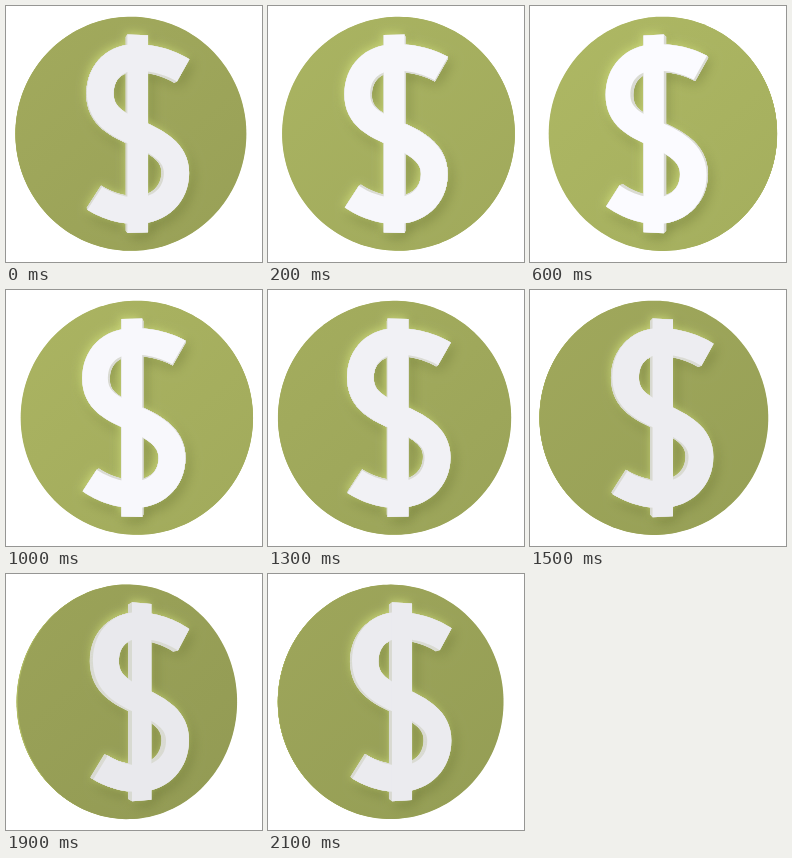
An HTML page with a canvas that plays this animation: 256 by 256 pixels, repeating every 2.2 s.

```html
<!DOCTYPE html>
<html lang="en">
<head>
<meta charset="utf-8">
<title>Turning dollar coin</title>
<style>
html, body { margin: 0; width: 100%; height: 100%; overflow: hidden; background: #fff; }
canvas { display: block; width: 256px; height: 256px; }
</style>
</head>
<body>
<canvas id="stage" width="256" height="256"></canvas>
<script>
const ctx = document.getElementById('stage').getContext('2d');
const LOOP = 2200, STEP = 100;
const EYE = 450, MID_X = 128.3, MID_Y = 127.8;
const RADIUS = 117, RIM = 9, FACE_Z = 9, SIGN_Z = 20;
const STROKE = 26.5;

// Yaw in degrees over time, joined by a smooth periodic curve.
const keys = [[0, -9.5], [200, 6], [600, 13], [1000, 7], [1500, -12.5], [1900, -21], [2100, -16]];

function key(i) {
  const n = keys.length, turn = Math.floor(i / n);
  const [t, v] = keys[i - turn * n];
  return [t + turn * LOOP, v];
}

function slope(i) {
  const [t0, v0] = key(i - 1), [t1, v1] = key(i + 1);
  return (v1 - v0) / (t1 - t0);
}

function yawAt(t) {
  let i = keys.length - 1;
  while (keys[i][0] > t) i--;
  const [t0, v0] = key(i), [t1, v1] = key(i + 1);
  const d = t1 - t0, u = (t - t0) / d, w = 1 - u;
  return v0 * w * w * (1 + 2 * u) + v1 * u * u * (3 - 2 * u)
    + d * u * w * (slope(i) * w - slope(i + 1) * u);
}

// Centre line of the S: a start point, then cubic segments.
const spine = [
  [47, -64.5], [33, -72.5], [16, -76.5], [0, -76.5],
  [-22, -76.5], [-37.5, -62], [-37.5, -40],
  [-37.5, -17], [-19, -9], [0, -0.5],
  [20, 8.5], [40, 18], [40, 40],
  [40, 62], [23, 77], [0, 77],
  [-14, 77], [-30, 72], [-43, 63.5]
];

function thicken(line, width) {
  const left = [], right = [];
  for (let i = 0; i + 3 < line.length; i += 3) {
    const [a, b, c, d] = line.slice(i, i + 4);
    for (let j = 0; j <= 16; j++) {
      const u = j / 16, w = 1 - u;
      const at = n => a[n] * w ** 3 + 3 * b[n] * w * w * u + 3 * c[n] * w * u * u + d[n] * u ** 3;
      const along = n => (b[n] - a[n]) * w * w + 2 * (c[n] - b[n]) * w * u + (d[n] - c[n]) * u * u;
      const x = at(0), y = at(1), k = width / 2 / Math.hypot(along(0), along(1));
      const nx = -along(1) * k, ny = along(0) * k;
      left.push([x + nx, y + ny]);
      right.unshift([x - nx, y - ny]);
    }
  }
  return left.concat(right);
}

const ess = thicken(spine, STROKE);
const bar = [[-10.5, -99], [10.5, -99], [10.5, 99], [-10.5, 99]];
const round = Array.from({ length: 180 }, (_, i) => {
  const a = i * Math.PI / 90;
  return [RADIUS * Math.cos(a), RADIUS * Math.sin(a)];
});

let sin = 0, cos = 1;

// Adds a flat shape at depth z; its size is given as seen face-on at depth base.
function trace(path, shape, z, base) {
  const size = 1 - base / EYE;
  shape.forEach(([px, py], i) => {
    const x = px * size, k = EYE / (EYE - x * sin - z * cos);
    const sx = MID_X + (x * cos - z * sin) * k, sy = MID_Y + py * size * k;
    if (i) path.lineTo(sx, sy); else path.moveTo(sx, sy);
  });
  path.closePath();
}

function disc(z, fill) {
  const path = new Path2D();
  trace(path, round, z, FACE_Z);
  ctx.fillStyle = fill;
  ctx.fill(path);
}

function dollar(z, fill) {
  ctx.fillStyle = fill;
  for (const part of [ess, bar]) {
    const path = new Path2D();
    trace(path, part, z, SIGN_Z);
    ctx.fill(path);
  }
}

function glow(color, blur, dx, dy) {
  ctx.save();
  ctx.shadowColor = color;
  ctx.shadowBlur = blur;
  ctx.shadowOffsetX = dx;
  ctx.shadowOffsetY = dy;
  dollar(SIGN_Z, '#d9dad2');
  ctx.restore();
}

const shade = (r, g, b, k) => `rgb(${[r, g, b].map(v => Math.round(v * k))})`;

function draw(t) {
  const a = yawAt(t) * Math.PI / 180;
  sin = Math.sin(a);
  cos = Math.cos(a);

  ctx.fillStyle = '#fff';
  ctx.fillRect(0, 0, 256, 256);

  const lit = 1 + 0.2 * sin;
  const face = ctx.createLinearGradient(40, 30, 215, 225);
  face.addColorStop(0, shade(166, 175, 95, lit));
  face.addColorStop(1, shade(158, 167, 90, lit));
  for (let z = FACE_Z - RIM; z < FACE_Z; z++) disc(z, '#b2bd66');
  disc(FACE_Z, face);

  glow('rgba(98,108,44,.5)', 13, 3, 5);
  glow('rgba(206,218,122,.85)', 9, -2, -2);
  for (let z = FACE_Z; z < SIGN_Z; z += 0.5) dollar(z, '#d9dad2');
  const light = Math.round(244 + 32 * sin);
  dollar(SIGN_Z, `rgb(${light},${light},${light + 4})`);
}

function tick(now) {
  draw(Math.floor(now % LOOP / STEP) * STEP);
  requestAnimationFrame(tick);
}

draw(0);
requestAnimationFrame(tick);
</script>
</body>
</html>
```
